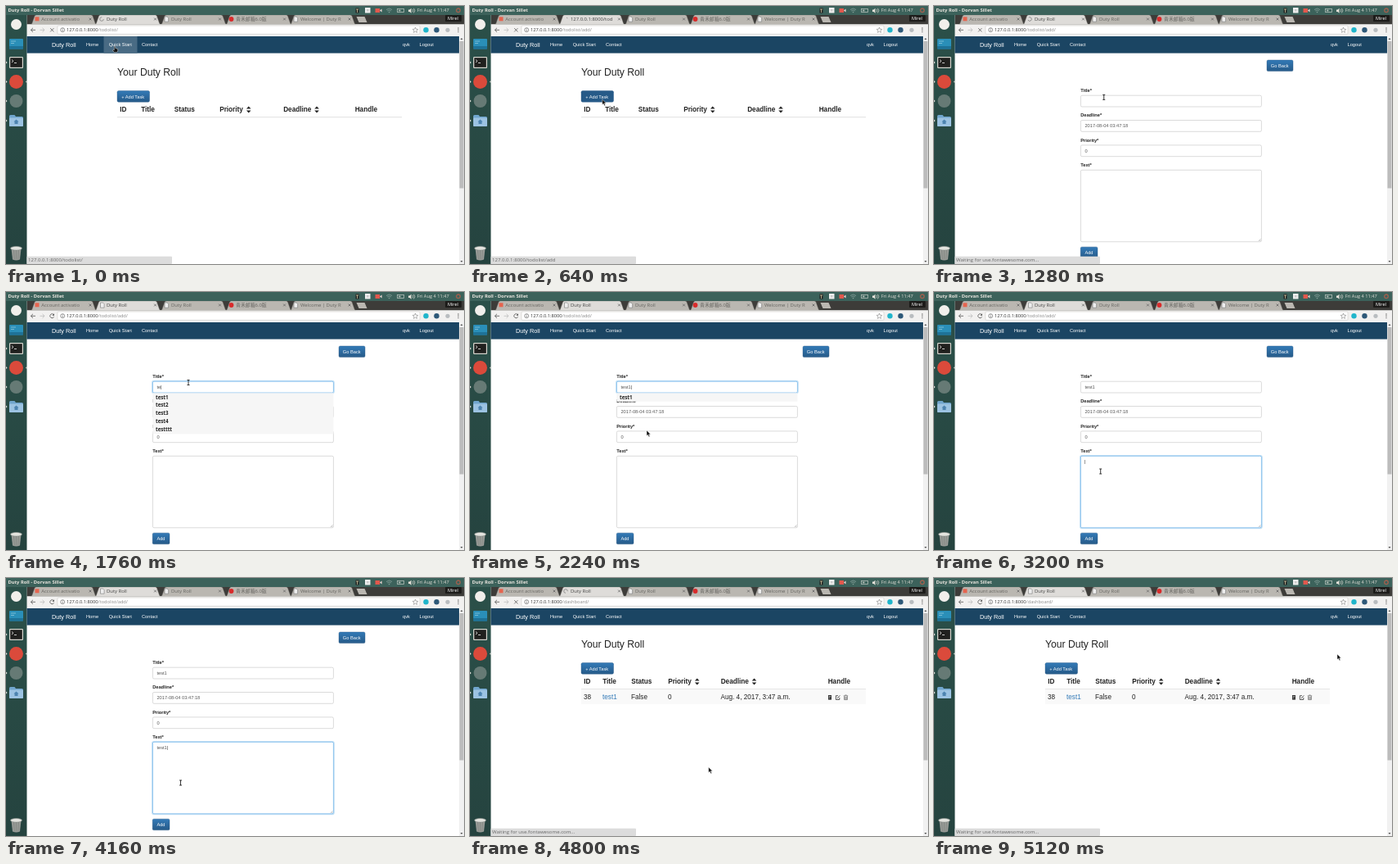
Write an HTML page that moves like this. It is 560 px wide and 315 px high and loops after 5280 ms.

```html
<!DOCTYPE html>
<html lang="en">
<head>
<meta charset="utf-8">
<title>Duty Roll</title>
<style>
html, body { margin: 0; width: 100%; height: 100%; overflow: hidden; background: #fff; }
svg { display: block; width: 100%; height: 100%; }
text { font-family: "Liberation Sans", Arial, sans-serif; white-space: pre; }
.ui { font-family: "Open Sans", "Noto Sans CJK SC", "Noto Sans CJK", sans-serif; }
.b { font-weight: bold; }
</style>
</head>
<body>
<svg id="stage" viewBox="0 0 560 315">
  <defs>
    <linearGradient id="btn" x2="0" y2="1"><stop stop-color="#337ab7"/><stop offset="1" stop-color="#265a88"/></linearGradient>
    <linearGradient id="dock" x2="0" y2="1"><stop stop-color="#2b5049"/><stop offset="1" stop-color="#25433f"/></linearGradient>
  </defs>
  <g id="desk"></g>
  <g id="view"></g>
</svg>
<script>
const LOOP = 5280, STEP = 160;
const APP = "Duty Roll", HOST = "127.0.0.1:8000";
const $ = id => document.getElementById(id);

const rect = (x, y, w, h, fill, more = "") =>
  `<rect x="${x}" y="${y}" width="${w}" height="${h}" fill="${fill}" ${more}/>`;
const dot = (x, y, r, fill) => `<circle cx="${x}" cy="${y}" r="${r}" fill="${fill}"/>`;
const path = (d, fill, more = "") => `<path d="${d}" fill="${fill}" ${more}/>`;
const line = (d, color, w = .8) => path(d, "none", `stroke="${color}" stroke-width="${w}"`);
const text = (x, y, s, size = 5.7, fill = "#222", cls = "") =>
  `<text x="${x}" y="${y}" font-size="${size}" fill="${fill}" class="${cls}">${s}</text>`;
const ui = (x, y, s, size = 5.9, fill = "#666561") => text(x, y, s, size, fill, "ui");
const bold = (x, y, s, size = 5.7) => text(x, y, s, size, "#222", "b");

const cross = (x, y, r, color) =>
  line(`M${x - r} ${y - r}l${2 * r} ${2 * r}m0 ${-2 * r}l${-2 * r} ${2 * r}`, color);
const doc = (x, y) => path(`M${x - 2} ${y - 3}h3l1.6 1.6v4.6h-4.6z`, "#eee", 'stroke="#777" stroke-width=".6"');
const tab = (x, fill) =>
  path(`M${x} 22.5q1.5 0 2-1.5l3-8.5q.6-1.5 2-1.5h67q1.4 0 2 1.5l3 8.5q.5 1.5 2 1.5z`, fill, 'stroke="#84827d" stroke-width=".4"');

function panel() {
  const pale = "#e4e0d8", dim = "#b4bfb8";
  return rect(0, 0, 560, 11, "#3c625b") +
    text(2.5, 7.2, `${APP} - Dorvan Sillet`, 5.8, "#e8e5de", "ui b") +
    rect(427.5, 2.5, 4, 6, "#222") + line("M428 4h3M429.5 4v4", "#e6dfb0", .7) +
    rect(439, 2, 6.5, 6.5, "#eee") + rect(441, 4, 2.5, 2.5, "#ccc") +
    rect(451.5, 3, 5.5, 5, "#e2584d") + path("M457 5.5l2.5-2v4z", "#f0d8d4") +
    line("M465 4.5q3.5-3 7 0M466.3 6q2.2-2 4.4 0", "#8aa39d") + dot(468.5, 7.5, .8, "#8aa39d") +
    rect(478.5, 3.5, 8, 4, "none", `stroke="${dim}" stroke-width=".8"`) + rect(480, 4.7, 2.5, 1.6, dim) +
    path("M492 4.5h1.5l2-1.8v6l-2-1.8h-1.5z", pale) + line("M497 3.8q1.5 1.7 0 3.6M498.5 2.8q2.6 2.7 0 5.6", pale, .7) +
    ui(502.7, 7.3, "Fri Aug 4 11:47", 5.7, pale) +
    `<circle cx="553" cy="5.3" r="2.3" fill="none" stroke="#a0604e" stroke-width="1.3"/>`;
}

function dock() {
  return rect(0, 11, 25.5, 304, "url(#dock)") +
    dot(12.5, 22.5, 6.5, "#f1efeb") +
    rect(4, 40, 17, 12.5, "#2a8fb8", 'rx="1"') + rect(4, 49, 17, 3.5, "#1f7398") + line("M6 43h6M6 45.5h4", "#8cc7dc") +
    rect(4, 62, 17, 14, "#d8d8d0", 'rx="1.2"') + rect(5.2, 63.2, 14.6, 11.6, "#20201e") +
    line("M7 65.5l2 1.7-2 1.7M10 69.5h3", "#eee") +
    dot(12.5, 92.5, 8.5, "#db4a3b") + dot(12.5, 116, 8, "#667a75") +
    path("M4 134.5q0-1.5 1.5-1.5h5l1.5 2h7.5q1.5 0 1.5 1.5v10h-17z", "#70a5cd") + rect(4, 136.5, 17, 10.5, "#9cc3e2", 'rx="1"') +
    path("M12.5 138.5l3 2.7h-1v2.8h-4v-2.8h-1z", "#4d84b0") +
    [69, 92.5, 116, 140].map(y => path(`M0 ${y - 1.5}l1.5 1.5-1.5 1.5z`, "#e8e6e0")).join("") +
    path("M25.5 91l-1.5 1.5 1.5 1.5z", "#e8e6e0") +
    path("M6.5 296h12l-1.5 13.5q-4.5 2-9 0z", "#979a96") + line("M9.5 298l.8 11M12.5 298v11M15.5 298l-.8 11", "#7c817d", .6) +
    `<ellipse cx="12.5" cy="295.8" rx="7" ry="2.3" fill="#e4e4df" stroke="#8a918b" stroke-width=".6"/>`;
}

function chrome() {
  const grey = "#555", off = "#bab7b1";
  return rect(25.5, 11, 534.5, 11.5, "#3d3c39") +
    [347, 268.5, 189, 30].map(x => tab(x, off)).join("") + tab(108.5, "#dedcd9") +
    rect(35.5, 13.3, 5, 5, "#e6644f") + ui(43.3, 18, "Account activatio") +
    doc(196, 16) + ui(202, 18, APP) +
    dot(275.5, 16, 2.9, "#d92b2b") + ui(281, 18, "青禾邮箱6.0版") +
    doc(354, 16) + ui(360, 18, "Welcome | Duty R") +
    [103, 182.5, 261.5, 340.5, 420].map(x => cross(x, 16, 1.4, "#666")).join("") +
    path("M428.5 13h10l3 7h-10z", off) +
    rect(537, 11, 20, 8, "#1d1c1a", 'rx="1"') + ui(540, 16.8, "Mirel", 5.5, "#fff") +
    rect(25.5, 22.5, 534.5, 14.5, "#f2f1f0") +
    line("M36 29.3h-5.5M33 26.8l-2.6 2.5 2.6 2.5", grey) + line("M41.5 29.3h5.5M44.5 26.8l2.6 2.5-2.6 2.5", "#bbb") +
    rect(63, 24, 443, 10.3, "#fff", 'rx="1" stroke="#c4c2bf" stroke-width=".5"') +
    `<circle cx="69.2" cy="29.2" r="2.5" fill="none" stroke="${grey}" stroke-width=".6"/>` + line("M69.2 28.7v2M69.2 27.3v.7", grey, .7) +
    path("M500.5 26l.9 2.2 2.4.2-1.8 1.6.5 2.4-2-1.3-2 1.3.5-2.4-1.8-1.6 2.4-.2z", "none", 'stroke="#666" stroke-width=".5"') +
    dot(513.5, 29.3, 3.2, "#20b5cb") + dot(526.5, 29.3, 3.2, "#2d5878") + dot(540, 29.3, 2.6, "#b9bdc0") +
    [27, 29.3, 31.6].map(y => dot(553, y, .7, grey)).join("") +
    rect(554, 37, 6, 278, "#f1f1f1") + rect(554.5, 43, 5, 179.5, "#bcbcbc") +
    path("M555.5 41l1.5-2 1.5 2z", grey) + path("M555.5 311l1.5 2 1.5-2z", grey);
}

function button(x, y, w, label, pad, hot) {
  return rect(x, y, w, 13.6, hot ? "#265a88" : "url(#btn)", 'rx="1.6" stroke="#245580" stroke-width=".4"') +
    text(x + pad, y + 8.9, label, 5.7, "#fff");
}

function nav(hot) {
  const item = (x, s) => text(x, 49.2, s, 5.7, "#fff");
  return rect(25.5, 37, 528.5, 20.6, "#1b4563") +
    (hot ? rect(119.5, 37, 41, 20.6, "#496b84") : "") +
    text(56, 50, APP, 7.3, "#fff") + item(98, "Home") + item(125.7, "Quick Start") +
    item(166, "Contact") + item(485, "qvk") + item(505.5, "Logout");
}

function list(filled, hot) {
  const xs = filled ? [139, 162, 197, 242, 306.5, 437.5] : [139, 165, 205.5, 261, 339, 426.5];
  const names = ["ID", "Title", "Status", "Priority", "Deadline", "Handle"];
  const sort = x => path(`M${x - 2.8} 125.6l2.8-3 2.8 3zm0 1.8l2.8 3 2.8-3z`, "#222");
  let s = text(136, 85.4, "Your " + APP, 12.15) + button(136, 103.6, 39.5, "+ Add Task", 5.2, hot) +
    names.map((n, i) => bold(xs[i] + .2, 129.4, n, 8.2)).join("") +
    sort(xs[3] + 35.7) + sort(xs[4] + 41) + rect(136, 135.3, 348, .9, "#ddd");
  if (filled) {
    const row = ["38", "test1", "False", "0", "Aug. 4, 2017, 3:47 a.m."];
    s += rect(136, 136.2, 348, 17.8, "#f9f9f9") +
      row.map((v, i) => text(xs[i], 148.4, v, 8.2, i == 1 ? "#337ab7" : "#222")).join("") +
      rect(438, 143, 4, 5.6, "#333") + line("M438.8 144.6h2.4M438.8 146.2h1.5", "#fff", .6) +
      line("M450 143.7h-2.6v4.8h4.4v-2.5M449 147l3.3-3.6", "#333") +
      line("M457.6 144.2v4.4h3.8v-4.4M456.8 143.8h5.4M458.5 143h2M458.9 145v3M460.2 145v3", "#444", .6);
  }
  return s;
}

const FIELDS = [[109.2, 13.8, "Title*"], [139.5, 13.8, "Deadline*"], [169.9, 13.8, "Priority*"], [200.3, 87.5, "Text*"]];

function form(s, hot) {
  const title = "test1".slice(0, [0, 1, 2, 2, 4][s - 9] ?? (s < 9 ? 0 : 5));
  const body = "test1".slice(0, Math.max(0, s - 21));
  const focus = s < 9 ? -1 : s < 20 ? 0 : 3;
  const blink = s > 15 && s < 19;
  const values = [title, "2017-08-04 03:47:18", "0", body];
  let out = button(407, 66, 32, "Go Back", 4.8) + button(179.2, 294.2, 20.8, "Add", 5.2, hot);
  FIELDS.forEach(([y, h, label], i) => {
    const on = i == focus;
    const caret = on && !blink ? '<tspan dx="-.3" fill="#222">|</tspan>' : "";
    out += bold(179.2, y - 4.2, label) +
      (on ? rect(178.8, y - .6, 222.2, h + 1.2, "none", 'rx="2" stroke="#c6e2f6" stroke-width="1.6"') : "") +
      rect(179.4, y, 221, h, "#fff", `rx="1.6" stroke="${on ? "#66afe9" : "#ccc"}" stroke-width=".7"`) +
      text(184.4, y + 8.9, values[i] + caret, 5.7, "#555");
  });
  out += line("M397 287l2.5-2.5M398.6 287l.9-.9", "#888", .5);
  const hints = s < 10 || s > 19 ? [] : s < 14 ? ["test1", "test2", "test3", "test4", "testttt"] : ["test1"];
  if (hints.length) out += rect(179.4, 123.3, 221, hints.length * 9.9 + .5, "#f6f6f6");
  return out + hints.map((h, i) => text(183, 130.5 + i * 9.85, h, 6.15, "#222", "ui b")).join("");
}

// Pointer stops: step, x, y
const TRAIL = [[0, 133, 49], [1, 135, 53], [3, 159, 110], [4, 161.7, 114], [5, 162, 114], [9, 223, 110.5], [13, 223, 110.5],
  [14, 216, 169], [19, 203.7, 219], [21, 203.7, 219], [26, 213.5, 250], [28, 190, 301], [29, 191, 300], [32, 493, 93]];

function pointer(s) {
  const i = Math.max(1, TRAIL.findIndex(p => p[0] >= s));
  const [a, ax, ay] = TRAIL[i - 1], [b, bx, by] = TRAIL[i];
  const k = (s - a) / (b - a);
  return [ax + (bx - ax) * k, ay + (by - ay) * k];
}

function cursor(x, y, kind) {
  const edge = 'stroke="#fff" stroke-width=".4"';
  if (kind == "beam") return line(`M${x - 1.5} ${y - 3}h3M${x} ${y - 3}v6M${x - 1.5} ${y + 3}h3`, "#222", .9);
  if (kind == "hand") return path(`M${x - .7} ${y}h1.4v2.6l3 .8v2.6l-1 1.6h-3.4l-2-2.6.9-.8 1.1.8z`, "#111", edge);
  return path(`M${x} ${y}v6.6l1.5-1.4 1.2 2.6 1.2-.6-1.2-2.4h2.1z`, "#111", edge);
}

function browser(s) {
  const busy = s < 2 || s > 3 && s < 9 || s > 28 && s < 32;
  const opening = s == 4 || s == 5;
  const url = s < 4 ? "/todolist/" : s < 30 ? "/todolist/add/" : "/dashboard/";
  const status = s < 2 ? HOST + "/todolist/" : s < 3 ? "" : s < 6 ? HOST + "/todolist/add"
    : s < 9 || s > 29 ? "Waiting for use.fontawesome.com..." : s > 28 ? "Waiting for 127.0.0.1..." : "";
  const arc = opening ? "1.5 13" : "10 4.5";
  const spin = `<circle cx="117" cy="16" r="2.3" fill="none" stroke="#777" stroke-width=".7" stroke-dasharray="${arc}" transform="rotate(${s * 75} 117 16)"/>`;
  return (busy ? spin + cross(56.3, 29.3, 2.1, "#555")
      : doc(117.5, 16) + line("M58.2 27.6a2.5 2.5 0 1 0 .4 2.6", "#555") + path("M59 26.3v2.5h-2.5z", "#555")) +
    ui(123, 18, opening ? HOST + "/tod" : APP, 5.9, "#444") +
    ui(74, 31.3, `${HOST}<tspan fill="#888">${url}</tspan>`, 5.7, "#333") +
    (status ? rect(25.5, 305.8, 177.5, 9.2, "#dcdcdc", 'rx="1"') + ui(27, 312.2, status, 6.05, "#666") : "");
}

function draw(s) {
  const [x, y] = pointer(s);
  const over = (l, t, w, h) => x >= l && x <= l + w && y >= t && y <= t + h;
  const onForm = s > 5 && s < 30;
  const onNav = over(119.5, 37, 41, 20.6);
  const onAdd = onForm && over(179, 294, 21, 14);
  const onTask = !onForm && over(136, 103, 40, 14.5);
  const inField = onForm && FIELDS.some(([t, h]) => over(179, t, 221, h));
  const kind = inField ? "beam" : onNav ? "hand" : "arrow";
  $("view").innerHTML = nav(onNav) + (onForm ? form(s, onAdd) : list(s > 29, onTask)) +
    browser(s) + cursor(x, y, kind);
}

$("desk").innerHTML = rect(0, 0, 560, 315, "#fff") + chrome() + panel() + dock();

let shown = -1;
const start = performance.now();
function tick() {
  const s = Math.floor((performance.now() - start) % LOOP / STEP);
  if (s !== shown) draw(shown = s);
  requestAnimationFrame(tick);
}
tick();
</script>
</body>
</html>
```
